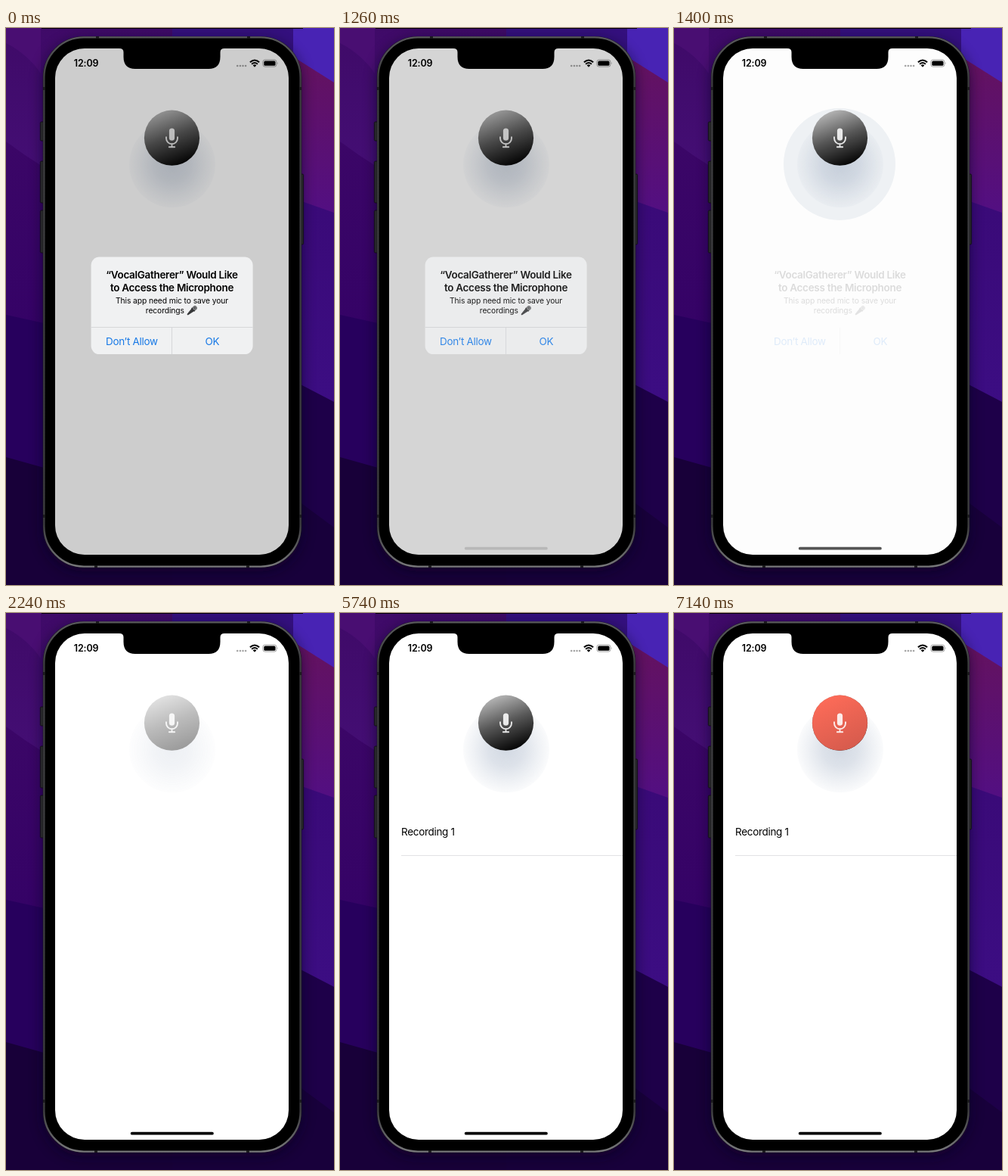
An HTML page that plays this animation: 434 px wide and 736 px high, repeating every 8 s.

```html
<!DOCTYPE html>
<html lang="en">
<head>
<meta charset="utf-8">
<title>Voice recorder demo</title>
<style>
html, body { margin: 0; width: 100%; height: 100%; overflow: hidden; background: #1b0040; }
svg { display: block; width: 100%; height: 100%; }
text { font-family: Inter, "Liberation Sans", sans-serif; font-size: 13.47px; letter-spacing: -.29px; }
.mid { text-anchor: middle; }
.bold { font-weight: 600; }
.small { font-size: 10.3px; letter-spacing: -.1px; }
.blue { fill: #1678e6; }
.time { font-size: 12.5px; letter-spacing: -.15px; }

.dim, .card, .copy, .home, .glow, .halo, .press, .red, .row {
  animation: 8s step-end infinite;
}
.dim { animation-name: dim; }
.card { animation-name: card; }
.copy { animation-name: copy; }
.home { animation-name: home; }
.glow { animation-name: glow; }
.halo { animation-name: halo; }
.press { animation-name: press; }
.red { animation-name: red; }
.row { animation-name: row; }

/* alert closes from 1260 to 1540 ms */
@keyframes dim {
  0% { opacity: .196 } 15.75% { opacity: .165 } 16.625% { opacity: .08 }
  17.5% { opacity: .006 } 18.375%, 100% { opacity: 0 }
}
@keyframes card {
  0% { opacity: 1 } 15.75% { opacity: .83 } 16.625%, 100% { opacity: 0 }
}
@keyframes copy {
  0% { opacity: 1 } 15.75% { opacity: .87 } 16.625% { opacity: .43 }
  17.5% { opacity: .13 } 18.375% { opacity: .03 } 19.25%, 100% { opacity: 0 }
}
@keyframes home {
  0% { opacity: 0 } 15.75% { opacity: .13 } 16.625% { opacity: .38 }
  17.5% { opacity: .66 } 18.375% { opacity: .88 } 19.25%, 100% { opacity: 1 }
}
@keyframes glow {
  0% { opacity: 0 } 16.625% { opacity: 1 } 17.5%, 100% { opacity: 0 }
}
@keyframes halo {
  0% { opacity: 0 } 17.5% { opacity: 1 } 18.375%, 100% { opacity: 0 }
}
/* record button: held, recording, stopped, held, recording */
@keyframes press {
  0% { opacity: 1 } 28% { opacity: .4 } 37.625% { opacity: 1 }
  82.25% { opacity: .4 } 89.25%, 100% { opacity: 1 }
}
@keyframes red {
  0% { opacity: 0 } 37.625% { opacity: 1 } 71.75% { opacity: 0 } 89.25%, 100% { opacity: 1 }
}
@keyframes row {
  0% { opacity: 0 } 71.75%, 100% { opacity: 1 }
}
</style>
</head>
<body>
<svg viewBox="0 0 434 736">
  <defs>
    <linearGradient id="leftTop" x1="0" y1="0" x2="0" y2="1">
      <stop offset="0" stop-color="#3f0a68"/><stop offset="1" stop-color="#46107a"/>
    </linearGradient>
    <linearGradient id="leftMid" x1="0" y1="0" x2="0" y2="1">
      <stop offset="0" stop-color="#3b0667"/><stop offset="1" stop-color="#340266"/>
    </linearGradient>
    <linearGradient id="rightMid" x1="0" y1="0" x2="0" y2="1">
      <stop offset="0" stop-color="#64125f"/><stop offset="1" stop-color="#520f83"/>
    </linearGradient>
    <linearGradient id="rightLow" x1="0" y1="0" x2="0" y2="1">
      <stop offset="0" stop-color="#3a0a78"/><stop offset="1" stop-color="#3c0d83"/>
    </linearGradient>
    <linearGradient id="darkFace" gradientUnits="userSpaceOnUse" x1="205" y1="109" x2="231" y2="179">
      <stop offset="0" stop-color="#b9b9b9"/><stop offset=".5" stop-color="#585858"/><stop offset="1" stop-color="#080808"/>
    </linearGradient>
    <linearGradient id="redFace" gradientUnits="userSpaceOnUse" x1="203" y1="112" x2="236" y2="179">
      <stop offset="0" stop-color="#fc6b58"/><stop offset="1" stop-color="#d65b4d"/>
    </linearGradient>
    <radialGradient id="shade">
      <stop offset="0" stop-color="#788caa" stop-opacity=".33"/>
      <stop offset=".4" stop-color="#788caa" stop-opacity=".25"/>
      <stop offset=".75" stop-color="#788caa" stop-opacity=".12"/>
      <stop offset="1" stop-color="#788caa" stop-opacity=".035"/>
    </radialGradient>
    <linearGradient id="rim" x1="0" y1="0" x2="0" y2="1">
      <stop offset="0" stop-color="#59595c"/><stop offset=".08" stop-color="#3b3b3e"/>
      <stop offset=".92" stop-color="#3b3b3e"/><stop offset="1" stop-color="#77777a"/>
    </linearGradient>
    <filter id="soft" x="-20%" y="-10%" width="140%" height="120%"><feGaussianBlur stdDeviation="9"/></filter>
    <clipPath id="screen"><rect x="65" y="27" width="309" height="669" rx="39"/></clipPath>
  </defs>

  <!-- wallpaper -->
  <rect width="434" height="736" fill="#1a0041"/>
  <path d="M0 0H220V280H0Z" fill="url(#leftTop)"/>
  <path d="M0 0H46V60Q28 34 0 20Z" fill="#4d1077" opacity=".7"/>
  <path d="M0 150Q24 168 50 184L220 260V420H0Z" fill="url(#leftMid)"/>
  <path d="M0 379L50 390L220 430V610H0Z" fill="#27005d"/>
  <path d="M0 567L50 581L220 610V736H0Z" fill="#180039"/>
  <path d="M220 0H434V80L220 40Z" fill="#34107e"/>
  <path d="M380 0H434V80L380 42Z" fill="#4823b4"/>
  <path d="M380 38L434 72V250L380 228Z" fill="url(#rightMid)"/>
  <path d="M380 225L434 244V500L380 470Z" fill="url(#rightLow)"/>
  <path d="M380 466L434 494V736H220V600Z" fill="#1e0049"/>
  <path d="M380 620L434 660V736H220V700Z" fill="#18003b"/>
  <rect x="47" width="346" height="1" fill="#050008"/>

  <!-- phone -->
  <rect x="49" y="16" width="342" height="702" rx="54" fill="#08001a" opacity=".6" filter="url(#soft)"/>
  <g fill="#27272a" stroke="#0f0f11" stroke-width=".8">
    <rect x="45.4" y="124" width="6" height="25" rx="1.5"/>
    <rect x="45.4" y="176" width="6" height="55" rx="1.5"/>
    <rect x="45.4" y="241" width="6" height="56" rx="1.5"/>
    <rect x="388" y="193" width="5.6" height="93" rx="1.5"/>
  </g>
  <rect x="48.8" y="11" width="342.4" height="702" rx="54" fill="#141416"/>
  <rect x="50.4" y="12.4" width="339.2" height="699.2" rx="52.6" fill="#000" stroke="url(#rim)" stroke-width="2.4"/>
  <path d="M121 11v3M321 11v3M119 710v3M320 710v3M49 80h3M388 80h3M49 645h3M388 645h3" stroke="#1b1b1d" stroke-width="4"/>

  <g clip-path="url(#screen)">
    <rect x="65" y="27" width="309" height="669" fill="#fff"/>

    <g class="row">
      <text x="81" y="293.8">Recording 1</text>
      <path d="M81 320.5H374" stroke="#e2e2e4"/>
    </g>

    <g class="glow">
      <rect x="139" y="98" width="164" height="159" rx="48" fill="#f6f6f6"/>
      <circle cx="219.5" cy="180" r="50" fill="none" stroke="#c6dcea" stroke-width="5" opacity=".6"/>
    </g>
    <circle class="halo" cx="219" cy="180" r="74" fill="#f0f3f6"/>

    <g class="press">
      <circle cx="220" cy="180.3" r="57" fill="url(#shade)"/>
      <circle cx="219.5" cy="145.2" r="36.6" fill="url(#darkFace)"/>
      <circle class="red" cx="219.5" cy="145.2" r="36.6" fill="url(#redFace)"/>
      <g fill="none" stroke="#fff" stroke-linecap="round" opacity=".87">
        <path d="M219.5 136V145.2" stroke-width="7.2"/>
        <path d="M212 144.3V145.8A7.5 7.5 0 0 0 227 145.8V144.3M219.5 153.5V157M215.8 157.2H223.2" stroke-width="1.9"/>
      </g>
    </g>

    <!-- status bar -->
    <text class="bold time" x="89.8" y="51">12:09</text>
    <g fill="#a4a4a4">
      <circle cx="306.2" cy="50" r="1.3"/><circle cx="309.9" cy="50" r="1.3"/>
      <circle cx="313.5" cy="50" r="1.3"/><circle cx="317.1" cy="50" r="1.3"/>
    </g>
    <path d="M322.9 45.3Q329 39.6 335.1 45.3M325.1 47.8Q329 44.2 332.9 47.8" fill="none" stroke="#000" stroke-width="2"/>
    <path d="M326.7 49.3Q329 47.4 331.3 49.3L329 51.8Z"/>
    <rect x="339.9" y="42.1" width="18" height="9" rx="2.7" fill="none" stroke="#999" stroke-width=".9"/>
    <rect x="341.3" y="43.4" width="15.2" height="6.4" rx="1.5"/>
    <path d="M358.9 45.1Q360.3 46.6 358.9 48.1Z" fill="#999"/>

    <rect class="dim" x="65" y="27" width="309" height="669"/>
    <rect class="home" x="164.8" y="685.8" width="110" height="3.8" rx="1.9"/>

    <!-- permission alert -->
    <g class="card">
      <rect x="112.6" y="302.5" width="214" height="128.6" rx="11" fill="#f0f1f2"/>
      <path d="M112.6 395.5H326.6" stroke="#d6d7d9"/>
    </g>
    <g class="copy">
      <path d="M219.5 396V431" stroke="#d6d7d9"/>
      <text class="mid bold" x="219.5" y="331.2">“VocalGatherer” Would Like</text>
      <text class="mid bold" x="219.5" y="348.2">to Access the Microphone</text>
      <text class="mid small" x="219.5" y="364.3">This app need mic to save your</text>
      <text class="small" x="184.8" y="377">recordings</text>
      <g transform="rotate(-42 246 373.5)">
        <path d="M238 372.6L248 371V376L238 374.4Z" fill="#37383a"/>
        <rect x="247.6" y="370.5" width="1.6" height="6" fill="#1f2022"/>
        <circle cx="251.2" cy="373.5" r="3" fill="#77787a"/>
        <path d="M250 372l2.5 2.5M252.5 372l-2.5 2.5" stroke="#4c4d4f" stroke-width=".6"/>
      </g>
      <text class="mid blue" x="166.4" y="418.5">Don’t Allow</text>
      <text class="mid blue" x="273" y="418.5">OK</text>
    </g>
  </g>

  <!-- notch -->
  <path d="M150 26H289V27Q283.5 27 283.5 32V38Q283.5 54 268 54H171Q155.5 54 155.5 38V32Q155.5 27 150 27Z"/>
</svg>
</body>
</html>
```
